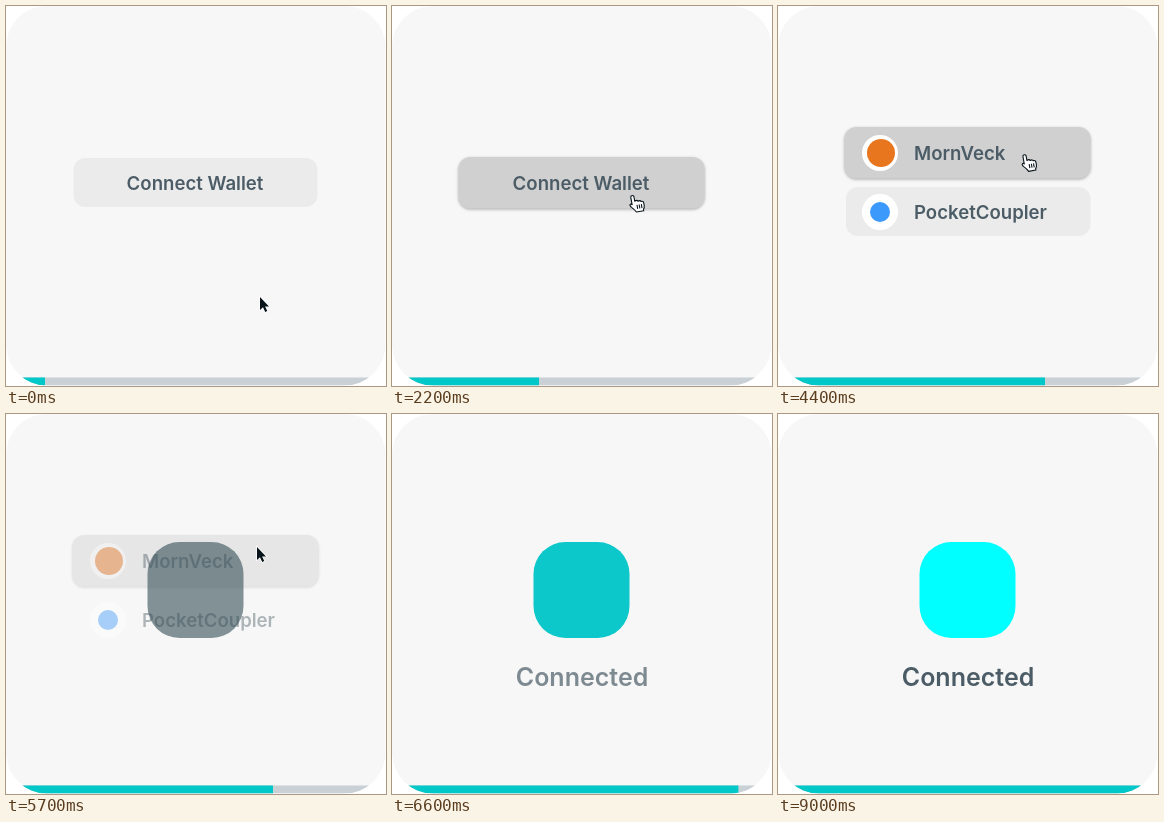
Recreate the animation shown at these times as an HTML page. Size 380 by 380 pixels, loop 9.2 s.

```html
<!DOCTYPE html>
<html lang="en">
<head>
<meta charset="utf-8">
<title>Connect wallet</title>
<style>
  html, body { margin: 0; width: 100%; height: 100%; overflow: hidden; background: #fff; }
  svg { display: block; width: 100vw; height: 100vh; }
  text { font: 600 18.6px Inter, "Open Sans", sans-serif; fill: #4b5c66; }
</style>
</head>
<body>
<svg viewBox="0 0 380 380">
  <defs>
    <clipPath id="card"><rect width="379.5" height="379.5" rx="41"/></clipPath>
    <linearGradient id="wipe" x2="0" y2="1">
      <stop id="wipeTop" offset=".2" stop-color="#4b5c66"/>
      <stop id="wipeEnd" offset=".78" stop-color="#4b5c66"/>
    </linearGradient>
  </defs>
  <g clip-path="url(#card)">
    <rect width="380" height="380" fill="#f7f7f7"/>
    <rect y="371.5" width="380" height="8" fill="#c9d0d6"/>
    <rect id="bar" y="371.5" height="8" fill="#00c8c8"/>
  </g>

  <rect id="row1" rx="12"/>
  <rect id="row2" x="68" width="244.5" height="49" rx="12" fill="#ebebeb"/>
  <text id="label" x="189" y="184" text-anchor="middle" style="fill:url(#wipe)">Connect Wallet</text>

  <g id="list">
    <circle cx="102" cy="147" r="18" fill="#fff"/>
    <circle cx="103" cy="147" r="14" fill="#e8761f"/>
    <text x="136" y="154">MornVeck</text>
    <circle cx="102" cy="206" r="18" fill="#fff"/>
    <circle cx="102" cy="206" r="10" fill="#3b99fc"/>
    <text x="136" y="213">PocketCoupler</text>
  </g>

  <rect id="tile" x="141.5" y="128" width="96" height="96" rx="32"/>
  <text id="done" x="190" y="272" text-anchor="middle" style="font-size:25px">Connected</text>

  <g id="cursor">
    <path id="arrow" d="M0 0V13L3 10.2L5.2 15L7.3 14.1L5.1 9.4H9Z"
      fill="#08141a" stroke="#fff" stroke-width="1.4" paint-order="stroke"/>
    <g id="hand" transform="translate(-2 .5) rotate(-10)" stroke="#08141a" stroke-width="1.1" stroke-linejoin="round">
      <path fill="#fff" d="M-2 9V1.5a1.6 1.6 0 0 1 3.2 0V6q2.6-1.2 3.2.6q2.4-.9 3 .8q2.4-.4 2.4 2V12q0 2-1.4 3.5v1.5H1q-1-2.5-4-5.5q-2-2.5-.6-3.2q1-.3 1.6.7z"/>
      <path fill="none" d="M2.8 10v4M5 10v4M7.2 10v4"/>
    </g>
  </g>
</svg>
<script>
const LOOP = 9200, STEP = 100;
const $ = id => document.getElementById(id);
const set = (id, attrs) => {
  for (const name in attrs) $(id).setAttribute(name, attrs[name]);
};
const lerp = (a, b, k) => a + (b - a) * k;
const rgb = (a, b, k) => `rgb(${a.map((v, i) => Math.round(lerp(v, b[i], k)))})`;

function draw(t) {
  const ramp = (from, to) => Math.min(1, Math.max(0, (t - from) / (to - from)));
  const hover = ramp(1000, 1600), open = ramp(2800, 3500), pick = ramp(3900, 4400);
  const close = ramp(5300, 6000), finish = 1 - (1 - ramp(6200, 7000)) ** 1.75;

  set('bar', { width: 39 + 108 * hover + 120 * open ** 1.5 + 113 * finish });

  // The button splits into two rows; the upper one is hovered again later
  const split = open ** 5;
  const lift = Math.max(hover * (1 - open) ** 3, pick);
  const shade = Math.round(lerp(235, 208, lift));
  set('row1', {
    x: 67.5 - lift, y: lerp(152, 122, split) - lift,
    width: 244 + 2 * lift, height: 49 + 2.5 * lift,
    fill: `rgb(${shade},${shade},${shade})`, opacity: 1 - close,
  });
  $('row1').style.filter = lift ? `drop-shadow(0 1px 1.5px rgba(0,0,0,${0.3 * lift}))` : 'none';
  set('row2', { y: lerp(155, 181, split), opacity: open ? (1 - close) ** 3 : 0 });

  set('wipeTop', { 'stop-opacity': 1 - open });
  set('wipeEnd', { 'stop-opacity': Math.max(0, 1 - 1.75 * open) });
  set('list', { opacity: open * (1 - close) });
  set('tile', { fill: rgb([45, 70, 80], [0, 255, 255], finish), opacity: close });
  set('done', { opacity: finish });

  const enter = ramp(0, 1250), climb = ramp(3600, 4700), leave = ramp(5700, 6000);
  const x = 254 - 11.5 * enter + 8.5 * climb;
  const y = 291 - 102 * enter - 56 * climb - 66 * leave ** 3;
  const pointing = (t >= 1100 && t < 2900) || (t >= 4000 && t < 5400);
  set('cursor', { transform: `translate(${x} ${y})`, opacity: 1 - leave });
  set('hand', { opacity: +pointing });
  set('arrow', { opacity: +!pointing });
}

function tick(now) {
  draw(Math.floor(now % LOOP / STEP) * STEP);
  requestAnimationFrame(tick);
}
tick(performance.now());
</script>
</body>
</html>
```
